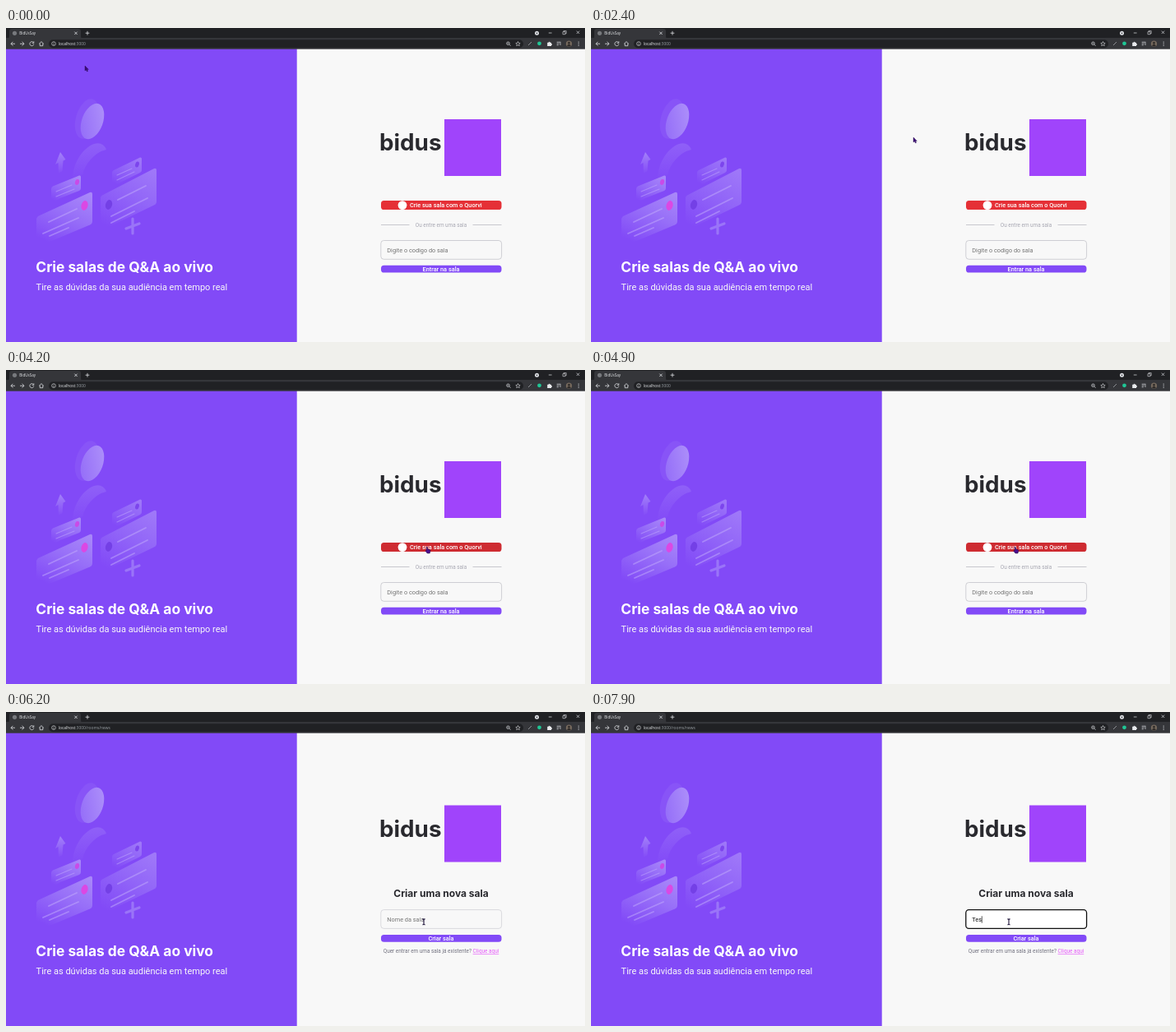
Write an HTML page that moves like this. It is 704x382 px and loops after 8000 ms.

```html
<!DOCTYPE html>
<html lang="pt">
<head>
<meta charset="utf-8">
<title>BidUsSay</title>
<style>
html, body { margin: 0; width: 100%; height: 100%; overflow: hidden; background: #f8f8f8; }
svg { display: block; width: 100vw; height: 100vh; }
text { font-family: Roboto, sans-serif; white-space: pre; }
.bar text { font-family: "Open Sans", sans-serif; fill: #e8eaed; }
.title { font-family: Inter, sans-serif; font-weight: 700; }
.mid { text-anchor: middle; }
.btn { font-size: 7.33px; font-weight: 500; fill: #fff; }
.field { fill: #f8f8f8; stroke: #b4b4bd; stroke-width: .6; }
.field.soft { stroke: #c4c4cc; }
.field.focus { fill: #fff; stroke: #101010; stroke-width: 1.3; }
.hint { font-size: 7.33px; fill: #757575; }
.icon { fill: none; stroke: #dfe1e5; stroke-width: .8; }
.lines path { fill: none; stroke: #c4aefb; stroke-width: 1.8; stroke-linecap: round; opacity: .5; }
.lines .thin { stroke-width: 1.1; }
</style>
</head>
<body>
<svg viewBox="0 0 704 382">
  <defs>
    <linearGradient id="card" x1=".85" y1="0" x2=".35" y2="1">
      <stop offset="0" stop-color="#a887f9"/>
      <stop offset=".45" stop-color="#976ff8"/>
      <stop offset="1" stop-color="#824af7"/>
    </linearGradient>
    <linearGradient id="fade" x1="0" y1="0" x2="0" y2="1">
      <stop offset="0" stop-color="#a381f9"/>
      <stop offset="1" stop-color="#834bf7"/>
    </linearGradient>
    <linearGradient id="disc" x1="1" y1="0" x2="0" y2="1">
      <stop offset="0" stop-color="#b094fa"/>
      <stop offset="1" stop-color="#9169f8"/>
    </linearGradient>
  </defs>

  <rect width="704" height="382" fill="#f8f8f8"/>
  <rect y="25" width="353.700" height="357" fill="#824af7"/>

  <g class="art">
    <ellipse cx="98.500" cy="110.500" rx="13.500" ry="25" transform="rotate(16 98.500 110.500)" fill="#8854f7"/>
    <ellipse cx="105" cy="113.500" rx="12.800" ry="22.600" transform="rotate(20 105 113.500)" fill="url(#disc)"/>
    <path d="M81 184C81 165 93 146 107 141Q118 138 122 148C109 151 97 163 93 179Z" fill="url(#fade)" opacity=".4"/>
    <path d="M66 151L72.500 160 69.500 161.500 68.500 174 64 177 63.500 164 60 166Z" fill="url(#fade)"/>
    <path d="M55 196Q55 193.500 57 192.500L89 179.500Q91 179 91 181V195Q91 197 89 198L66 207 55 214Z" fill="url(#card)"/>
    <ellipse cx="86.500" cy="187.500" rx="2.500" ry="3.500" transform="rotate(15 86.500 187.500)" fill="#c94be8"/>
    <path d="M129 176Q129 174 131 173L163 157.500Q165 157 165 159V173Q165 175 163 176L139 188 129 194Z" fill="url(#card)" opacity=".75"/>
    <ellipse cx="159.500" cy="166" rx="2.300" ry="3.500" transform="rotate(15 159.500 166)" fill="#7c45ed"/>
    <path d="M37 233Q37 230 40 228.500L102 200Q105 199 105 202V235Q105 238 102 239.500L58 258 37 265Z" fill="url(#card)"/>
    <ellipse cx="95.500" cy="216" rx="4" ry="6" transform="rotate(15 95.500 216)" fill="#db48e4"/>
    <path d="M115 207Q115 204 118 203L180 171Q183 170 183 173V211Q183 214 180 215.500L127 241 115 250Z" fill="url(#card)" opacity=".75"/>
    <ellipse cx="125" cy="215" rx="4" ry="6" transform="rotate(15 125 215)" fill="#7440e6"/>
    <g class="lines">
      <path d="M52 236L86 220M45 250L88 231M53 253L76 243"/>
      <path d="M136 209L170 192M128 229L172 207M128 237L156 223"/>
      <path class="thin" d="M61 199L80 191M61 205L83 196M135 179L153 171M135 185L156 175"/>
    </g>
    <path d="M154 232V250M146 244L162 238" stroke="#9a74f8" stroke-width="3.200" stroke-linecap="round"/>
  </g>
  <text class="title" x="36.300" y="297.300" font-size="17.350" fill="#fff">Crie salas de Q&amp;A ao vivo</text>
  <text x="36.600" y="319.200" font-size="11" fill="#f8f8f8">Tire as dúvidas da sua audiência em tempo real</text>

  <g id="brand">
    <text class="title" x="454" y="149" font-size="27.800" fill="#29292e">bidus</text>
    <rect x="533" y="111" width="69" height="69" fill="#a044fb"/>
  </g>

  <g id="home">
    <rect id="login" x="456" y="210" width="146.500" height="11" rx="3.600" fill="#e53036"/>
    <circle cx="482" cy="215.600" r="5.400" fill="#fff"/>
    <text class="btn" x="491" y="218.300">Crie sua sala com o Quorvi</text>
    <path d="M456 239.500H490.500M567.500 239.500H602.500" stroke="#a8a8b3" stroke-width=".6"/>
    <text class="mid" x="529" y="242" font-size="6.420" fill="#a8a8b3">Ou entre em uma sala</text>
    <rect class="field" x="455.800" y="258.500" width="146.800" height="22.800" rx="3.600"/>
    <text class="hint" x="463.300" y="272.600">Digite o codigo do sala</text>
    <rect x="456" y="288.800" width="146.500" height="8.700" rx="3.600" fill="#824af7"/>
    <text class="btn mid" x="529" y="295.900">Entrar na sala</text>
  </g>

  <g id="room">
    <text class="title mid" x="529" y="225" font-size="12" fill="#29292e">Criar uma nova sala</text>
    <rect id="name" x="455.800" y="240.600" width="146.800" height="22.800" rx="3.600"/>
    <text id="hint" class="hint" x="463.300" y="254.800">Nome da sala</text>
    <text id="typed" x="463.300" y="254.800" font-size="7.330" fill="#111"></text>
    <path id="caret" d="M0 248.300V256.700" stroke="#111" stroke-width=".7"/>
    <rect x="456" y="271" width="146.500" height="8.800" rx="3.600" fill="#824af7"/>
    <text class="btn mid" x="529" y="278.100">Criar sala</text>
    <text class="mid" x="529" y="293.300" font-size="6.420" fill="#737380">Quer entrar em uma sala já existente? <tspan fill="#e559f9" text-decoration="underline">Clique aqui</tspan></text>
  </g>

  <g class="bar">
    <rect width="704" height="13" fill="#202124"/>
    <rect y="12" width="704" height="13.700" fill="#35363a"/>
    <path d="M1 13Q4 13 4 10V4Q4 1 7 1H88Q91 1 91 4V10Q91 13 94 13Z" fill="#35363a"/>
    <circle cx="10.500" cy="6.300" r="2.600" fill="#77797d"/>
    <text x="16.300" y="8" font-size="4.600">BidUsSay</text>
    <rect x="52" y="14.200" width="577" height="10" rx="5" fill="#202124"/>
    <text x="63.800" y="20.900" font-size="4.900">localhost<tspan fill="#9aa0a6">:3000<tspan id="path"></tspan></tspan></text>
    <g class="icon">
      <path d="M83.300 4.600L86.700 8M86.700 4.600L83.300 8M99 3.800V8.600M96.600 6.200H101.400"/>
      <path d="M11 19.200H6M8.400 16.800L6 19.200 8.400 21.600M17 19.200H22M19.600 16.800L22 19.200 19.600 21.600"/>
      <path d="M33.300 17.600A2.500 2.500 0 1 0 33.800 19.700M33.800 16.300V18.300H31.800"/>
      <path d="M40.200 19.300L43 16.600 45.800 19.300M41.200 18.700V21.700H44.800V18.700"/>
      <path d="M659.800 6H663.600M693.800 3.600L697.200 7M697.200 3.600L693.800 7" stroke-width=".7"/>
      <path d="M677 4.700H680V7.700H677ZM678 4.700V3.500H681.200V6.700H680" stroke-width=".6"/>
      <path d="M58 18.800V20.800M58 17.200V17.900" stroke-width=".6"/>
      <circle cx="58" cy="19.100" r="2.400" stroke-width=".6"/>
      <circle cx="610.500" cy="18.700" r="1.800" stroke-width=".7"/>
      <path d="M611.900 20.100L613.600 21.800M609.700 18.700H611.300" stroke-width=".7"/>
      <path d="M622.500 16.500L623.300 18.300 625.200 18.500 623.800 19.800 624.200 21.700 622.500 20.700 620.800 21.700 621.200 19.800 619.800 18.500 621.700 18.300Z" stroke-width=".6"/>
      <path d="M635 21L639 17" stroke="#a5a7ab"/>
      <path d="M669.700 17.200H674.500M669.700 19H672.500M669.700 20.800H671.800M674 17.500V21" stroke-width=".7"/>
    </g>
    <circle cx="645.500" cy="6.300" r="2.500" fill="#dfe1e5"/>
    <path d="M644.200 5.700H646.800L645.500 7.300Z" fill="#202124"/>
    <circle cx="648.500" cy="18.800" r="2.400" fill="#1fc796"/>
    <path d="M658.200 17.700H659.600A1 1 0 0 1 661.600 17.700H663V19A1 1 0 0 1 663 21V22H658.200Z" fill="#e8eaed"/>
    <circle cx="684.500" cy="19.200" r="3.600" fill="#75695d"/>
    <path d="M682.200 21.900Q682.500 19.700 684.500 19.700T686.800 21.900Q684.500 23.300 682.200 21.900Z" fill="#302c2a"/>
    <circle cx="684.500" cy="18.200" r="1.400" fill="#302c2a"/>
    <path d="M696.200 16.600V17.600M696.200 18.700V19.700M696.200 20.800V21.800" stroke="#dfe1e5"/>
  </g>

  <g id="cursor">
    <path id="arrow" d="M0 0V6L1.400 4.800 2.500 7 3.500 6.500 2.500 4.400H4.300Z" fill="#3c0b78" stroke="#25094a" stroke-width=".4"/>
    <path id="hand" d="M1 .6Q1.800 -.2 2.300 .8L2.600 3 5 3.600Q6 4 5.700 5.600L5 8H2L-.2 5.200Q-.2 4.300 1.200 4.700Z" fill="#4b0d8e" stroke="#23083f" stroke-width=".5"/>
    <path id="beam" d="M-1.600 -3.400Q0 -3.400 0 -2.600Q0 -3.400 1.600 -3.400M0 -2.600V2.600M-1.600 3.400Q0 3.400 0 2.600Q0 3.400 1.600 3.400" fill="none" stroke="#1c1238" stroke-width="1.100"/>
  </g>
</svg>
<script>
const LOOP = 8000, STEP = 100;
const el = id => document.getElementById(id);
const show = (id, on) => el(id).setAttribute("visibility", on ? "inherit" : "hidden");
const move = (id, x, y) => el(id).setAttribute("transform", `translate(${x} ${y})`);

// time, x, y of the pointer
const route = [
  [0, 96, 46], [300, 96, 46], [800, 238, 96], [900, 238, 96],
  [1100, 325, 119], [1900, 325, 119], [2400, 392, 133], [2900, 392, 133],
  [3000, 335, 271], [3300, 335, 271], [3600, 456, 300], [3800, 456, 300],
  [3900, 504.5, 215], [4400, 514, 215], [4900, 514, 215],
  [5000, 518.5, 221], [5600, 518.5, 221], [6200, 508, 255.3], [LOOP, 508, 255.3]
];

function pointer(t) {
  const i = route.findIndex(p => p[0] > t);
  const [t0, x0, y0] = route[i - 1], [t1, x1, y1] = route[i];
  const k = (t - t0) / (t1 - t0);
  return [x0 + (x1 - x0) * k, y0 + (y1 - y0) * k];
}

function typedAt(t) {
  return "Tes".slice(0, t < 7500 ? 0 : 1 + Math.floor((t - 7500) / 200));
}

function draw(t) {
  const inRoom = t >= 5000, focus = t >= 6400;
  show("home", !inRoom);
  show("room", inRoom);
  move("brand", 0, inRoom ? 2.5 : 0);
  el("path").textContent = inRoom ? "/rooms/news" : "";

  const hover = Math.min(1, Math.max(0, (t - 3900) / 200));
  el("login").style.filter = `brightness(${1 - 0.1 * hover})`;

  const word = typedAt(t);
  el("typed").textContent = word;
  show("hint", inRoom && !word);
  el("name").setAttribute("class", focus ? "field focus" : "field soft");
  const width = word ? el("typed").getComputedTextLength() : 0;
  move("caret", 463.6 + width, 0);
  show("caret", focus && (t < 6900 || word));

  const [x, y] = pointer(t);
  const hand = t >= 3900 && !inRoom;
  const beam = inRoom && (y < 228 || y > 240);
  move("cursor", x, y);
  show("hand", hand);
  show("beam", beam);
  show("arrow", !hand && !beam);
}

// "inherit" keeps children hidden together with their group
const start = performance.now();
function tick() {
  const t = (performance.now() - start) % LOOP;
  draw(Math.floor(t / STEP) * STEP);
  requestAnimationFrame(tick);
}
tick();
</script>
</body>
</html>
```
